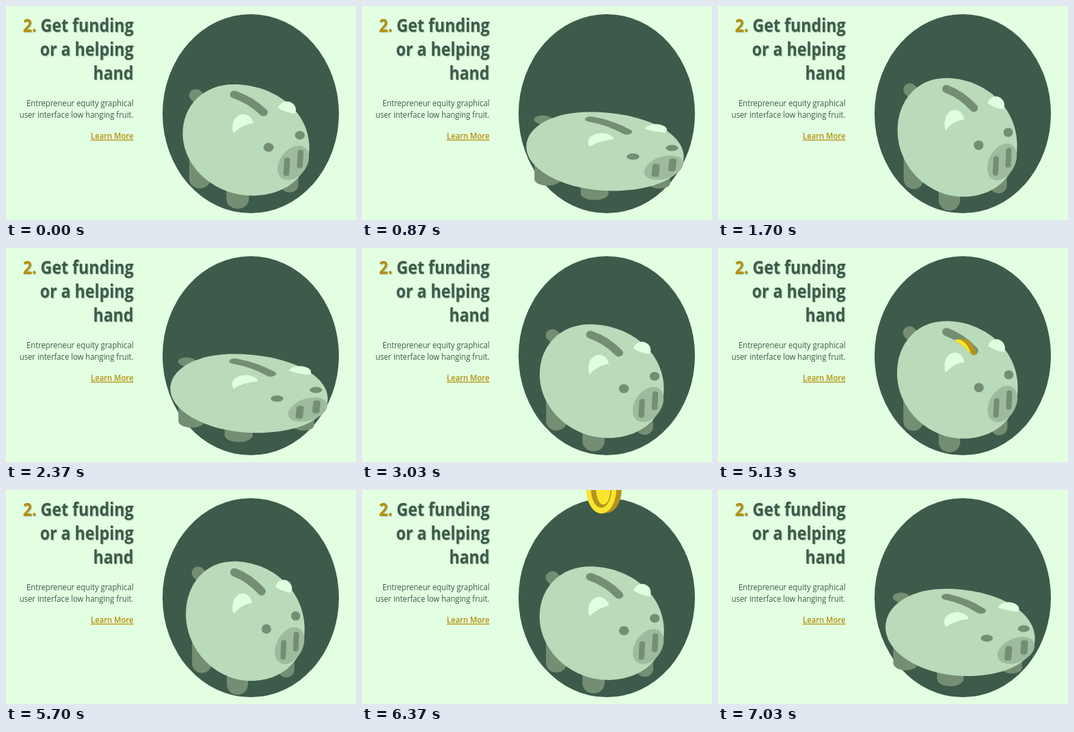
Write an HTML page that moves like this. It is 512 by 314 pixels and loops after 7.06 s.

```html
<!DOCTYPE html>
<html lang="en">
<head>
<meta charset="utf-8">
<title>Get funding</title>
<style>
  html, body { margin: 0; width: 100%; height: 100%; overflow: hidden; background: #e2ffe2; }
  svg { display: block; width: 512px; height: 314px; }
  text { font-family: "Open Sans", "Noto Sans", sans-serif; font-size: 12.75px; text-anchor: end; fill: #3d5b4b; }
  .title { font-size: 26.2px; font-weight: 700; text-shadow: 1px 1px 1px #9fbd9f; }
  .gold { fill: #b5900c; }
  .link { font-weight: 600; text-decoration: underline; }
  .limb { fill: none; stroke: #748e74; stroke-linecap: round; }
  .ear { fill: #e0ffe0; }
  .rim { fill: #b3941c; }
  .face { fill: #f9e52d; }
</style>
</head>
<body>
<svg viewBox="0 0 512 314">
  <defs>
    <!-- everything above the front lip of the slot -->
    <clipPath id="lip">
      <path id="lipShape" d="M230-300H500V149H380A6 6 0 0 1 369 153Q352 134 330 126H230Z"/>
    </clipPath>
  </defs>

  <!-- the picture is narrowed as a whole, so the type shares its aspect -->
  <g transform="translate(186.5 0) scale(.884 1)">
    <text class="title" y="38"><tspan class="gold">2.</tspan> Get funding</text>
    <text class="title" y="73">or a helping</text>
    <text class="title" y="108">hand</text>
    <text y="147">Entrepreneur equity graphical</text>
    <text y="164.5">user interface low hanging fruit.</text>
    <text class="gold link" y="195">Learn More</text>
  </g>

  <ellipse cx="358" cy="158" rx="129" ry="146" fill="#3d5b4b"/>

  <g id="pig">
    <g class="limb">
      <path d="M281 122L296 138" stroke-width="19"/>
      <path d="M286.5 215V254" stroke-width="29"/>
      <path d="M338.5 260V285" stroke-width="31"/>
      <path d="M410 245V263" stroke-width="24"/>
    </g>
    <path fill="#b9dbba" d="M263 182C263 138 292 105 333 105C388 105 437 146 437 205C437 252 402 280 358 280C308 280 263 236 263 182Z"/>
    <path class="limb" d="M334 121Q356 129 374 149" stroke-width="12"/>
    <path class="ear" d="M333 182C328 165 336 151 348 152C355 154 359 159 360 166C351 167 341 172 333 182Z"/>
    <path class="ear" d="M394 142C397 133 405 130 411 133C419 137 420 146 417 151C409 150 401 147 394 142Z"/>
    <ellipse cx="415" cy="228.500" rx="19" ry="29" transform="rotate(28 415 228.500)" fill="#9dbb9d"/>
    <g class="limb" stroke-width="8">
      <path d="M406.500 224L405.500 245M425 212L424 233"/>
    </g>
    <g fill="#748e74">
      <circle cx="381" cy="204" r="7"/>
      <circle cx="424" cy="185" r="6.800"/>
    </g>
  </g>

  <g clip-path="url(#lip)">
    <g id="coin">
      <ellipse class="rim" cx="358" cy="-1" rx="22" ry="36"/>
      <path class="rim" d="M350-36L358-37V35L350 36Z"/>
      <ellipse class="face" cx="350" rx="22" ry="36"/>
      <ellipse class="rim" cx="350" rx="15" ry="27.500"/>
      <ellipse class="face" cx="353" rx="10.500" ry="23"/>
    </g>
  </g>
</svg>
<script>
  const LOOP = 7060, CYCLE = 1500;
  const [pig, coin, lip] = ['pig', 'coin', 'lipShape'].map(id => document.getElementById(id));

  // [time in ms, squash]: the hit, then a dying wobble into the next cycle
  const wobble = [[600, .03], [930, 1.36], [1225, -.03], [1420, .36], [1640, -.01], [1870, .18], [2100, .03]];

  function squashAt(time) {
    const t = time < 600 ? time + CYCLE : time;
    const i = wobble.findIndex(key => key[0] > t);
    const [t0, a] = wobble[i - 1], [t1, b] = wobble[i];
    return a + (b - a) * (1 - Math.cos(Math.PI * (t - t0) / (t1 - t0))) / 2;
  }

  function draw(now) {
    const t = now % LOOP % CYCLE;
    const q = squashAt(t);
    const pose = `translate(333 254) scale(${1 + .257 * q} ${1 - .269 * q}) translate(-333 -254)`;
    pig.setAttribute('transform', pose);
    lip.setAttribute('transform', pose);
    coin.setAttribute('transform', `translate(0 ${-92 + .000658 * t * t})`);
    coin.setAttribute('visibility', t < 730 ? 'visible' : 'hidden');
  }

  const start = performance.now();
  function tick() {
    draw(performance.now() - start);
    requestAnimationFrame(tick);
  }
  tick();
</script>
</body>
</html>
```
